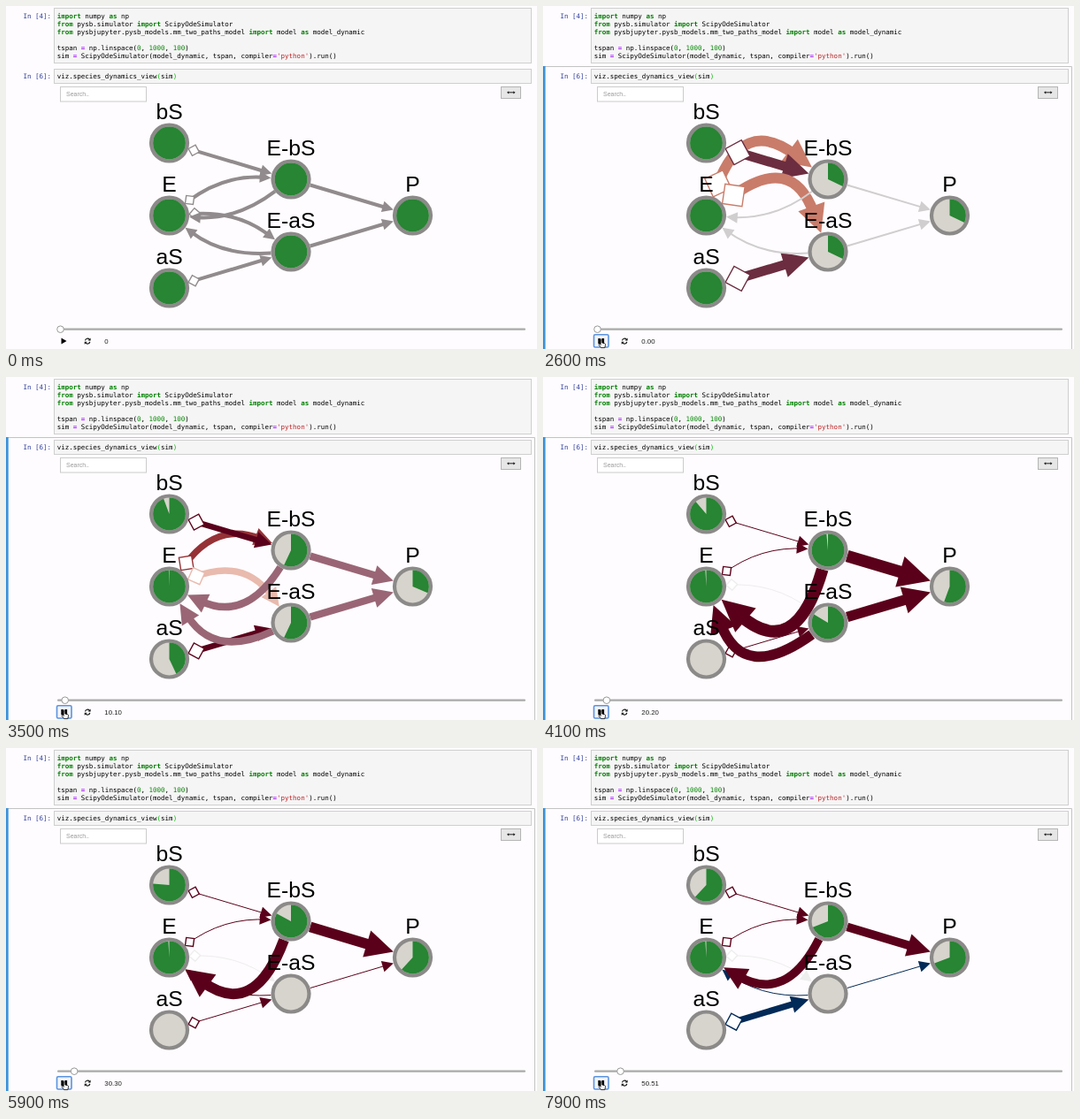
Recreate the animation shown at these times as an HTML page. Size 600 by 388 pixels, loop 8 s.

```html
<!DOCTYPE html>
<html lang="en">
<head>
<meta charset="utf-8">
<title>Species dynamics view</title>
<style>
  html, body { margin: 0; width: 100%; height: 100%; overflow: hidden; background: #fefcfe; }
  svg { display: block; width: 600px; height: 388px; }
  text { white-space: pre; font-family: "Liberation Sans", Arial, sans-serif; }
  .code text { font: 7.5px "DejaVu Sans Mono", monospace; fill: #000; }
  .code .prompt { fill: #303f9f; }
  .kw { fill: #008000; font-weight: bold; }
  .op { fill: #aa22ff; font-weight: bold; }
  .num { fill: #008800; }
  .str { fill: #ba2121; }
  .par { fill: #00bb00; }
  .ui { font-size: 7.8px; fill: #222; }
  .label { font-size: 24.7px; text-anchor: middle; }
</style>
</head>
<body>
<svg viewBox="0 0 600 388">
  <g id="selection">
    <path d="M0 68.5H597.5V388" fill="none" stroke="#c4c4c4"/>
    <rect y="68" width="2.7" height="320" fill="#3b93db"/>
  </g>

  <g class="code">
    <rect x="54.5" y="2.5" width="539" height="62" fill="#f6f5f6" stroke="#cfcfcf"/>
    <rect x="54.5" y="71.5" width="539" height="16" fill="#f6f5f6" stroke="#cfcfcf"/>
    <text class="prompt" x="19.5" y="13.8">In [4]:</text>
    <text class="prompt" x="19.5" y="82">In [6]:</text>
    <text x="57.7" y="13.8"><tspan class="kw">import</tspan> numpy <tspan class="kw">as</tspan> np</text>
    <text x="57.7" y="22.9"><tspan class="kw">from</tspan> pysb.simulator <tspan class="kw">import</tspan> ScipyOdeSimulator</text>
    <text x="57.7" y="32"><tspan class="kw">from</tspan> pysbjupyter.pysb_models.mm_two_paths_model <tspan class="kw">import</tspan> model <tspan class="kw">as</tspan> model_dynamic</text>
    <text x="57.7" y="50.2">tspan <tspan class="op">=</tspan> np.linspace(<tspan class="num">0</tspan>, <tspan class="num">1000</tspan>, <tspan class="num">100</tspan>)</text>
    <text x="57.7" y="59.3">sim <tspan class="op">=</tspan> ScipyOdeSimulator(model_dynamic, tspan, compiler<tspan class="op">=</tspan><tspan class="str">'python'</tspan>).run()</text>
    <text x="57.7" y="82">viz.species_dynamics_view<tspan class="par">(</tspan>sim<tspan class="par">)</tspan></text>
  </g>

  <rect x="61.5" y="91.5" width="97" height="16.5" fill="#fff" stroke="#ccc"/>
  <text x="68" y="102.3" font-size="7" fill="#999">Search..</text>
  <rect x="559.5" y="91.5" width="22" height="13" fill="#e6e6e6" stroke="#b5b5b5"/>
  <path d="M567 97.8h7.5" stroke="#222"/>
  <path d="M566 97.8l2.2-1.6v3.2zM575.5 97.8l-2.2-1.6v3.2z" fill="#222"/>

  <g id="graph"></g>

  <rect x="58" y="364.5" width="529" height="2.2" rx="1" fill="#aaa"/>
  <circle id="thumb" cy="365.7" r="3.8" fill="#fff" stroke="#999"/>
  <path id="play" d="M62.5 375.5l6 3.5l-6 3.5z"/>
  <g id="pause">
    <rect x="57.5" y="371.7" width="16.5" height="14.3" rx="1.5" fill="#f1f3f8" stroke="#5b93e0" stroke-width="1.6"/>
    <path d="M62.3 376h2.8v6h-2.8zM66.3 376h2.8v6h-2.8z"/>
  </g>
  <path d="M89.5 378.4a2.8 2.8 0 0 1 4.8-1.4M94.8 379.8a2.8 2.8 0 0 1-4.8 1.4" fill="none" stroke="#111" stroke-width="1.2"/>
  <path d="M95.6 375.4v3h-3zM88.7 382.8v-3h3z" fill="#111"/>
  <text id="clock" class="ui" x="111.3" y="382"></text>
  <path id="hand" d="M-.8 0q.9-1 1.6 0v3l3 .8q.9.4.7 1.6l-.7 3.2h-4.2l-2.6-3.4q.2-1.2 1.2-.7l1 .9z" fill="#fff" stroke="#000" stroke-width=".8"/>
</svg>

<script>
const LOOP = 8000, START = 1915, STEP = 1010;
const ZOOM = 1.37, RADIUS = 22.6, THIN = 1, BASE = 4.1;
const $ = id => document.getElementById(id);

// Each list holds the value before play, then the value reached by each step.
const nodes = {
  bS:     { x: 184.5, y: 155, pie: [100, 100, 90, 82.5, 76, 68.5, 61.5] },
  E:      { x: 184.5, y: 237, pie: [100, 100, 99, 99, 99, 99, 99] },
  aS:     { x: 184.5, y: 319, pie: [100, 100, 0, 0, 0, 0, 0] },
  'E-bS': { x: 322, y: 196, pie: [100, 0, 100, 91, 82.5, 75.5, 68.5] },
  'E-aS': { x: 322, y: 278, pie: [100, 0, 100, 0, 0, 0, 0] },
  P:      { x: 459.5, y: 237, pie: [100, 0, 55, 58.5, 62, 66, 69.5] }
};
const colours = {
  g: [145, 139, 141], o: [227, 117, 90], r: [91, 0, 27],
  l: [238, 238, 238], b: [2, 42, 88]
};
const fall = w => [BASE, w, THIN, THIN, THIN, THIN, THIN];
const pulse = [BASE, THIN, 13.7, THIN, THIN, THIN, THIN];
const decay = [BASE, THIN, 13.7, 13.7, 11.7, 10.4, 9.6];
const edge = (from, to, bend, hollow, widths, hues) =>
  ({ a: nodes[from], b: nodes[to], bend, hollow, widths, hues });
const edges = [
  edge('E', 'E-bS', 1, true, fall(15.7), 'gorrrrr'),
  edge('bS', 'E-bS', 0, true, fall(14), 'grrrrrr'),
  edge('E', 'E-aS', 1, true, fall(15.7), 'golllll'),
  edge('aS', 'E-aS', 0, true, [BASE, 14, THIN, THIN, THIN, 7.7, 7], 'grrrrbb'),
  edge('E-aS', 'E', 1, false, pulse, 'glrrrbb'),
  edge('E-aS', 'P', 0, false, pulse, 'glrrrbb'),
  edge('E-bS', 'E', 1, false, decay, 'glrrrrr'),
  edge('E-bS', 'P', 0, false, decay, 'glrrrrr')
];

const mix = (a, b, p) => a + (b - a) * p;
const pts = list => list.map(q => q.map(v => v.toFixed(2)).join()).join(' ');

// Ray leaving a node towards the control point, with (along, across) coordinates.
function ray(node, cx, cy) {
  const dx = cx - node.x, dy = cy - node.y, len = Math.hypot(dx, dy);
  const ux = dx / len, uy = dy / len;
  return (along, across = 0) => [
    node.x + ux * (RADIUS + along) - uy * across,
    node.y + uy * (RADIUS + along) + ux * across
  ];
}

function drawEdge(e, i, p) {
  const w = mix(e.widths[i], e.widths[i + 1], p);
  const from = colours[e.hues[i]], to = colours[e.hues[i + 1]];
  const colour = `rgb(${from.map((v, k) => Math.round(mix(v, to[k], p)))})`;
  const { a, b } = e, dx = b.x - a.x, dy = b.y - a.y, len = Math.hypot(dx, dy);
  const off = e.bend * (27 + Math.max(0, w - BASE) * 8.8);
  const cx = (a.x + b.x) / 2 + dy / len * off;
  const cy = (a.y + b.y) / 2 - dx / len * off;
  const head = 0.32 * ZOOM * Math.max(29, (13.37 * w / ZOOM) ** 0.9);
  const src = ray(a, cx, cy), dst = ray(b, cx, cy), h = head / 2;
  let out = `<path d="M${pts([src(e.hollow ? w : 0)])}Q${pts([[cx, cy], dst(2 * w)])}" fill="none" stroke="${colour}" stroke-width="${w}"/>
    <polygon points="${pts([dst(0), dst(head, h), dst(head, -h)])}" fill="${colour}"/>`;
  if (e.hollow) out += `<polygon points="${pts([src(0), src(h, h), src(head), src(h, -h)])}" fill="#fff" stroke="${colour}" stroke-width="1.4"/>`;
  return out;
}

function drawNode([name, n], i, p) {
  const share = mix(n.pie[i], n.pie[i + 1], p);
  return `<g transform="translate(${n.x} ${n.y})">
    <circle r="${RADIUS}" fill="#8c8989"/><circle r="18.4" fill="#d6d4cc"/>
    <circle r="9.2" fill="none" stroke="#278533" stroke-width="18.4" pathLength="100" stroke-dasharray="${share} 100" transform="rotate(-90)"/>
    <text class="label" y="-27.2">${name}</text></g>`;
}

function frame() {
  const t = performance.now() % LOOP;
  const playing = t >= START;
  const run = Math.max(0, (t - START) / STEP);
  const i = Math.min(5, Math.floor(run)), p = Math.min(1, run - i);
  const time = i * 1000 / 99;

  $('graph').innerHTML = edges.map(e => drawEdge(e, i, p)).join('') +
    Object.entries(nodes).map(n => drawNode(n, i, p)).join('');
  $('thumb').setAttribute('cx', 61.5 + time * 0.515);
  $('clock').textContent = playing ? time.toFixed(2) : '0';
  $('selection').style.display = $('pause').style.display = playing ? '' : 'none';
  $('play').style.display = playing ? 'none' : '';
  const reach = Math.min(1, Math.max(0, (t - 1000) / 600));
  $('hand').setAttribute('transform', `translate(${mix(80, 66, reach)} ${mix(396, 378, reach)})`);
  requestAnimationFrame(frame);
}
frame();
</script>
</body>
</html>
```
